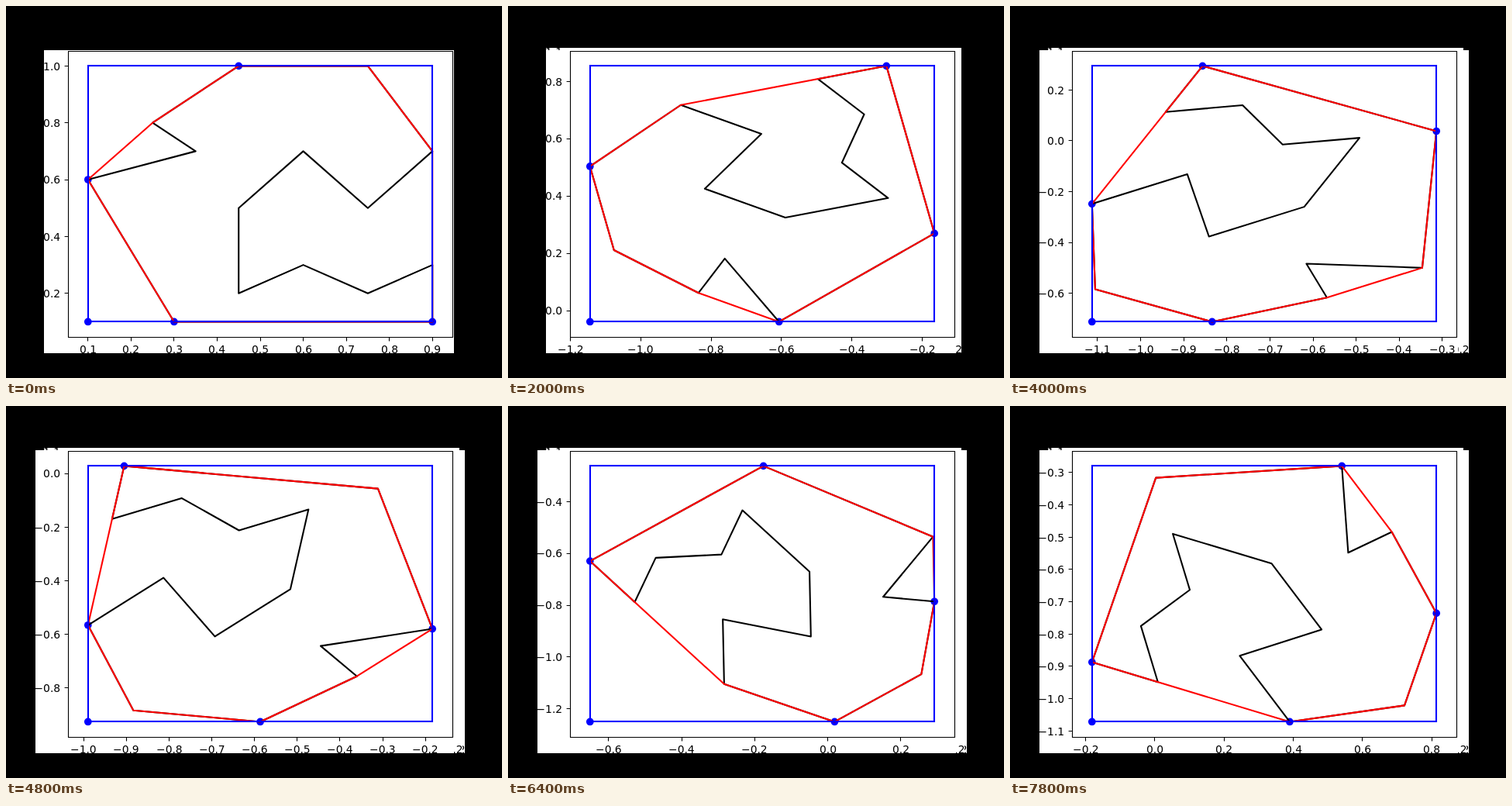
Animation of 640 by 480 pixels, one loop 8000 ms. Source, as an HTML page:

```html
<!DOCTYPE html>
<html lang="en">
<head>
<meta charset="utf-8">
<title>Rotating polygon, hull and bounding box</title>
<style>
  html, body { margin: 0; width: 100%; height: 100%; overflow: hidden; background: #000; }
  #stage { display: block; width: 640px; height: 480px; }
  text { font: 13.889px "DejaVu Sans", sans-serif; }
  .axis { fill: none; stroke: #000; stroke-width: 1.11; }
  .line { fill: none; stroke-width: 2.083; stroke-linejoin: round; }
  .box { stroke-linejoin: miter; }
</style>
</head>
<body>
<svg id="stage" viewBox="0 0 640 480"></svg>
<script>
const STEP_MS = 200, COUNT = 40;
const SHAPE = [
  [.3, .1], [.1, .6], [.35, .7], [.25, .8], [.45, 1], [.75, 1], [.9, .7], [.75, .5],
  [.6, .7], [.45, .5], [.45, .2], [.6, .3], [.75, .2], [.9, .3], [.9, .1]
];
const HULL = [0, 1, 3, 4, 5, 6, 14];

// Plot area, and the part of it spanned by the data
const AXES = { l: 80, r: 576, t: 57.6, b: 427.2 };
const DATA = { l: 105.8, r: 550.2, t: 77.35, b: 407.45 };

// The default sort compares as text: 0, 1, 10, 11, ... 19, 2, 20, ...
const order = [...Array(63).keys()].sort().slice(0, COUNT);

const rotate = a => SHAPE.map(([x, y]) =>
  [x * Math.cos(a) - y * Math.sin(a), x * Math.sin(a) + y * Math.cos(a)]);
const farthest = (pts, f) => pts.reduce((a, b) => f(b) > f(a) ? b : a);
const line = (pts, color) =>
  `<polygon class="line" stroke="${color}" points="${pts.map(p => p.map(v => v.toFixed(2))).join(" ")}"/>`;

// Linear scale from the values lo..hi to the pixels a..b
const scale = (lo, hi, a, b) => {
  const to = v => a + (v - lo) / (hi - lo) * (b - a);
  to.invert = p => lo + (p - a) / (b - a) * (hi - lo);
  return to;
};

function ticks(to, from, until) {
  const lo = to.invert(from), hi = to.invert(until);
  const size = (hi - lo) / 9 > .1 ? .2 : .1, list = [];
  for (let k = Math.ceil(lo / size); k <= hi / size; k++) {
    const neg = k < 0;
    list.push({
      pos: to(k * size), neg,
      label: (neg ? "\u2212" : "") + Math.abs(k * size).toFixed(1),
      width: neg ? 33.7 : 22.1
    });
  }
  return list;
}

// One plot; it repaints only the tight box around its own ink
function plot(angle) {
  const pts = rotate(angle);
  const west = farthest(pts, p => -p[0]), east = farthest(pts, p => p[0] - 1e-6 * p[1]);
  const south = farthest(pts, p => -p[1]), north = farthest(pts, p => p[1]);
  const sx = scale(west[0], east[0], DATA.l, DATA.r);
  const sy = scale(south[1], north[1], DATA.b, DATA.t);
  const px = p => [sx(p[0]), sy(p[1])];
  const poly = pts.map(px);

  let l = 49, t = 57, r = 578, b = 448, marks = "", labels = "";
  for (const k of ticks(sx, AXES.l, AXES.r)) {
    const x = Math.round(k.pos - k.width / 2);
    marks += `M${Math.floor(k.pos) + .5} 427.5v4.9`;
    labels += `<text x="${x}" y="448">${k.label}</text>`;
    r = Math.max(r, Math.round(x + k.width - 1));
  }
  for (const k of ticks(sy, AXES.b, AXES.t)) {
    const y = Math.round(k.pos + 5.3);
    marks += `M80.5 ${Math.floor(k.pos) + .5}h-4.9`;
    labels += `<text x="70.2" y="${y}" text-anchor="end">${k.label}</text>`;
    t = Math.min(t, y - 10);
    if (k.neg) l = 38;
  }

  const dots = [[west[0], south[1]], west, east, south, north].map(px)
    .map(([x, y]) => `<circle cx="${x}" cy="${y}" r="4.86" fill="#00f"/>`).join("");
  const w = r - l, h = b - t;
  return `<svg x="${l}" y="${t}" width="${w}" height="${h}" viewBox="${l} ${t} ${w} ${h}" display="none">
    <rect x="${l}" y="${t}" width="${w}" height="${h}" fill="#fff"/>
    ${dots}${line(poly, "#000")}${line(HULL.map(i => poly[i]), "#f00")}
    <rect class="line box" stroke="#00f" x="106" y="77" width="444" height="330"/>
    <path class="axis" d="${marks}M80.5 58.5h496v369h-496z"/>${labels}</svg>`;
}

const stage = document.getElementById("stage");
stage.innerHTML = order.map(n => plot(n / 10)).join("");
const layers = [...stage.children];
let shown = -1;

// Earlier plots stay underneath, so their margins remain visible
function draw(ms) {
  const now = Math.floor(ms / STEP_MS) % COUNT;
  if (now === shown) return;
  shown = now;
  layers.forEach((el, i) => el.setAttribute("display", i <= now ? "inline" : "none"));
}

function tick() {
  draw(performance.now());
  requestAnimationFrame(tick);
}
tick();
</script>
</body>
</html>
```
